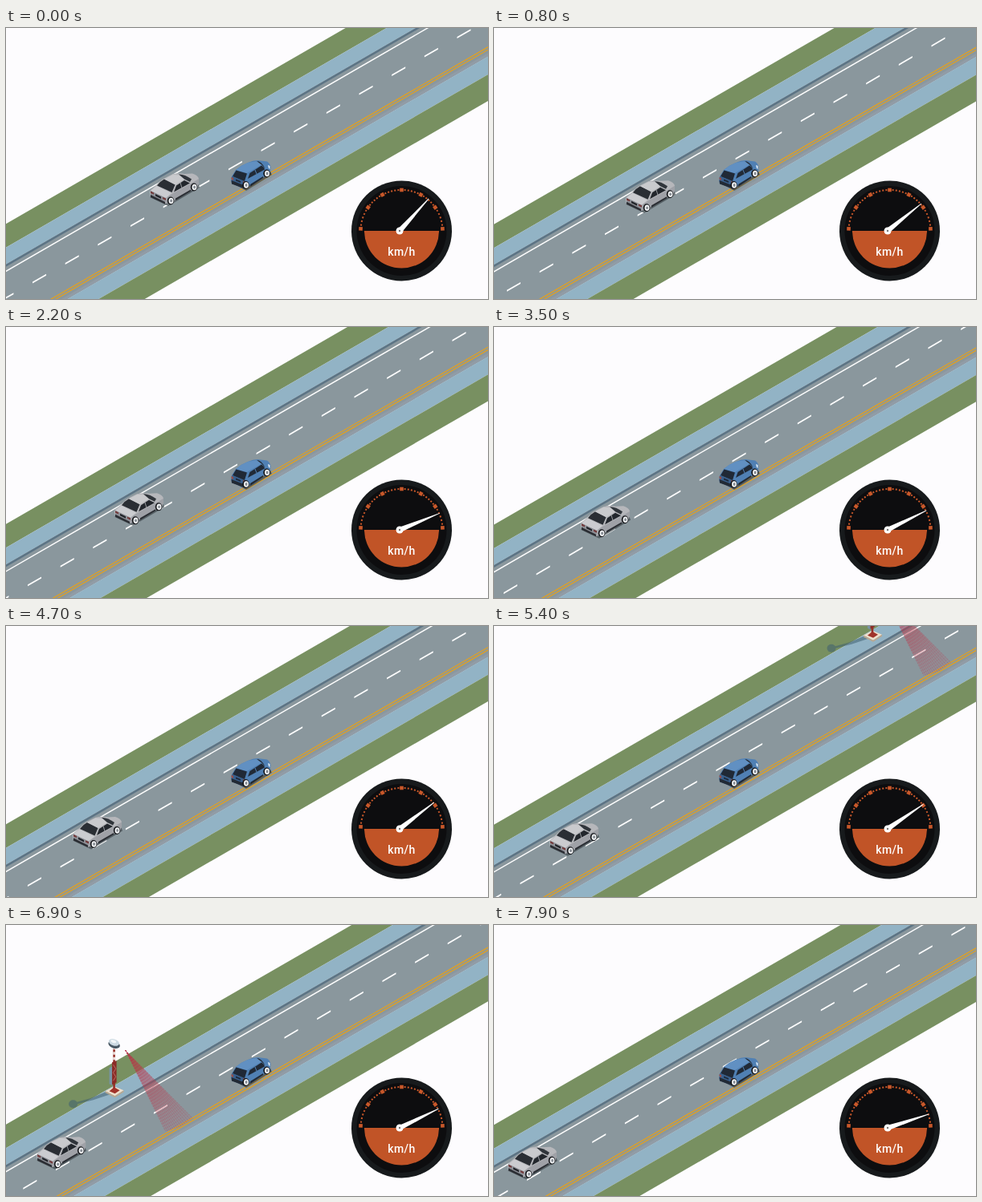
Write an HTML page that moves like this. It is 600 by 338 pixels and loops after 8 s.

```html
<!DOCTYPE html>
<html lang="en">
<head>
<meta charset="utf-8">
<title>Road and speedometer</title>
<style>
  html, body { margin: 0; width: 100%; height: 100%; overflow: hidden; background: #fdfcfe; }
  svg { display: block; width: 100vw; height: 100vh; }
  text { font: 500 14px Roboto, Arial, sans-serif; letter-spacing: .4px; }
</style>
</head>
<body>
<svg viewBox="0 0 600 338">
  <defs>
    <g id="wheel">
      <ellipse rx="4.2" ry="5" fill="#15171b"/>
      <ellipse cx=".5" rx="3" ry="3.8" fill="#f1f3f5"/>
      <ellipse cx=".6" rx="1.4" ry="1.9" fill="#868c93"/>
    </g>
    <linearGradient id="fade" gradientUnits="userSpaceOnUse" x1="328" y1="52" x2="395" y2="147">
      <stop offset="0" stop-color="#b8323f" stop-opacity=".6"/>
      <stop offset="1" stop-color="#c04a5c" stop-opacity=".12"/>
    </linearGradient>
  </defs>

  <!-- Horizontal bands, sheared to the slope of the road -->
  <g id="road"></g>

  <g id="tower">
    <g fill="#3f6070" opacity=".55">
      <ellipse cx="263" cy="119" rx="5.500" ry="5"/>
      <path d="M266 117L284 112L306 103L309 107L288 114L268 119Z"/>
    </g>
    <path d="M303 103L314 97L326 102L315 109Z" fill="#efe0cc"/>
    <path d="M303 103L315 109L326 102V104L315 111L303 105Z" fill="#b9a78f"/>
    <path d="M308 103L314 98L321 102L315 106Z" fill="#a0332a"/>
    <path d="M308 74L312 72V96L308 94Z" fill="#7894a5"/>
    <path d="M314 100V48" stroke="#96302a" stroke-width="2.600"/>
    <path d="M314 64V48" stroke="#f1e9e6" stroke-width="2.600" stroke-dasharray="3.500 3"/>
    <path d="M311.500 67L317 65V92L311.500 95Z" fill="#8b2b26"/>
    <path d="M313 70L316 75L313 80L316 85L313 90" fill="none" stroke="#c98a80" stroke-width=".7"/>
    <g transform="translate(314.500 43.500) rotate(18)">
      <ellipse cy="1.500" rx="7.500" ry="4.500" fill="#4a5965"/>
      <ellipse cx="-1" cy="-1" rx="6.800" ry="4" fill="#cddae3"/>
      <ellipse cx="-2" cy="-2" rx="3.500" ry="1.800" fill="#f2f6f8"/>
    </g>
  </g>

  <g id="sedan">
    <path d="M179 211L202 222L241 199L238 190Z" fill="#434c52" opacity=".75"/>
    <path d="M180 210Q178 205 180 202L187 196Q193 189 199 186.500L207 182.500Q214 180.500 222 182L232 181.500Q239 183.500 240 188V194L238 198L203 218L198 219Z" fill="#b6b7bb"/>
    <path d="M200 211L208 206L231 193.500L240 188V194L238 198L203 218L198 219Z" fill="#9fa1a7"/>
    <path d="M180 203L187.500 197L206 206L199 212Z" fill="#cbccd0"/>
    <path d="M180 203L199 212L198 219L180 210Z" fill="#8c8e95"/>
    <path d="M188 196.500Q192 191 197 188.500L210.500 195.500L206.500 205Z" fill="#2a2e34"/>
    <path d="M197 188.500L207.500 183L216 183.500L222 188.500L211 195.500Z" fill="#c9cacd"/>
    <path d="M215 182.500Q222 182 231 188.500L229 192L222 188.500Z" fill="#30353b"/>
    <path d="M209 204.500L212 196.500L222 190L229 193.500Z" fill="#23272d"/>
    <path d="M217 193L219 199.500" stroke="#a5a7ac" stroke-width=".9"/>
    <path d="M180 208L198 217V219.500L180 211ZM211 212.500L230 201.500V203.500L211 215Z" fill="#2a2d33"/>
    <path d="M186 207L193 210.500V213L186 209.500Z" fill="#22252a"/>
    <path d="M180 203.500L184 205.500V207.500L180 206ZM195 211L199 212.500V215L195 213Z" fill="#74393a"/>
    <use href="#wheel" x="205" y="215.500"/><use href="#wheel" x="234" y="198.500"/>
  </g>

  <g id="hatchback">
    <path d="M281 193L299 203L331 183L327 173Z" fill="#3d474f" opacity=".7"/>
    <path d="M280 190L281 185L286 177Q293 171 301 168Q310 164 317 165.500L325 166.500Q329 169 329.500 174L328.500 181L301 198L296 200L281 194Z" fill="#5080b4"/>
    <path d="M281 185L298 191L296 200L281 194Z" fill="#395f8c"/>
    <path d="M286 177Q293 171 301 168L313 166L319 170L300 181Z" fill="#6190c2"/>
    <path d="M282 185L286.500 177.500L300 181.500L297 191Z" fill="#202936"/>
    <path d="M301 188L303.500 181L318 171.500Q321 173 322 176.500Z" fill="#212a37"/>
    <path d="M310 177L312 182" stroke="#5080b4"/>
    <path d="M312 166Q318 166 322.500 175L318 170.500Z" fill="#27313e"/>
    <path d="M280.500 190L296 196V200L281 194.500ZM304 195L320 185V187L304 198Z" fill="#222a35"/>
    <path d="M286 188.500L292 191V193L286 190.500Z" fill="#1f2a3a"/>
    <path d="M280.500 186L283 187V190L280.500 189ZM295 191L298 192V195L295 194Z" fill="#96504a"/>
    <path d="M326 171L328.500 172V176L327 175Z" fill="#dce8f2"/>
    <use href="#wheel" x="298.500" y="196"/><use href="#wheel" x="324.500" y="181.500"/>
  </g>

  <g id="beam">
    <path d="M328 52L378 153Q398 149 412 137Z" fill="url(#fade)"/>
  </g>

  <g id="gauge" transform="translate(492.500 253)">
    <circle r="62.500" fill="#171a1c"/>
    <circle r="56" fill="#0d0d0f"/>
    <path d="M-46.500 0A46.500 46.500 0 0 0 46.500 0Z" fill="#c15427"/>
    <g id="ticks" fill="#c9582a"></g>
    <text y="30.500" text-anchor="middle" fill="#fff">km/h</text>
    <g transform="translate(-2.500 0)">
      <path id="needle" d="M0-3.200L54-.4V.4L0 3.200Z" fill="#fff"/>
      <circle r="4.500" fill="#fff"/>
      <circle r="1.200" fill="#777"/>
    </g>
  </g>
</svg>

<script>
const LOOP = 8000, STEP = 100, SLOPE = 0.578, GAP = 40.65;
const $ = id => document.getElementById(id);

function add(parent, name, attrs) {
  const el = document.createElementNS('http://www.w3.org/2000/svg', name);
  for (const key in attrs) el.setAttribute(key, attrs[key]);
  return $(parent).appendChild(el);
}

// Road stripes: top, bottom, colour
for (const [top, bottom, fill] of [
  [244.3, 273.8, '#789061'], [273.8, 294.8, '#92b3c5'],
  [294.8, 382.3, '#8a979d'], [294.8, 297.8, '#5c7485'],
  [302.5, 304.2, '#fff'], [369.8, 371.2, '#e5a11c'], [373.2, 374.6, '#e5a11c'],
  [378, 382.3, '#919ca6'], [382.3, 404.7, '#92b3c5'], [404.7, 437.8, '#789061']
]) add('road', 'rect', { x: -20, width: 640, y: top, height: bottom - top, fill });

const dashes = add('road', 'path', {
  d: 'M0 336.6H640', stroke: '#fff', 'stroke-width': 2, 'stroke-dasharray': `17 ${GAP - 17}`
});

// Dotted rays inside the radar beam
for (let i = 0; i <= 14; i++) {
  const u = i / 14;
  add('beam', 'path', {
    d: `M328 52L${378 + 34 * u} ${153 - 16 * u + 12 * u * (1 - u)}`,
    stroke: '#b8344a', 'stroke-width': 0.7, 'stroke-opacity': 0.5, 'stroke-dasharray': '2 1.500'
  });
}

// Dial marks: large squares with small dots in each gap
const marks = [-87, -55, -28, 0, 28, 55, 87], DOTS = 5;
function tick(angle, size) {
  add('ticks', 'rect', {
    x: -size / 2, y: -51 - size / 2, width: size, height: size, transform: `rotate(${angle})`
  });
}
marks.forEach((a, i) => {
  tick(a, 4.6);
  for (let k = 1; k <= DOTS && i < 6; k++) tick(a + (marks[i + 1] - a) * k / (DOTS + 1), 2);
});

// Key times in seconds, with the value of each moving part
const times = [0, 0.8, 2.2, 3.5, 4.7, 6.1, 7.9];
const travel = [0, 179.6, 493.8, 793.4, 1063, 1377, 1780.7];
const lag = [0, 15, 44, 71, 96, 124, 162];
const angles = [48, 39, 22.6, 26.6, 37.5, 31.7, 18.4];

function at(values, t, ease = u => u) {
  let i = 0;
  while (i < times.length - 2 && t > times[i + 1]) i++;
  const u = (t - times[i]) / (times[i + 1] - times[i]);
  return values[i] + (values[i + 1] - values[i]) * ease(u);
}
const smooth = u => u * u * (3 - 2 * u);
const move = (id, x, y) => $(id).setAttribute('transform', `translate(${x} ${y})`);

function draw(now) {
  const t = Math.floor(now % LOOP / STEP) * STEP / 1000;
  const drift = 5 * t / 7.9, distance = at(travel, t), back = at(lag, t);

  $('road').setAttribute('transform', `matrix(1 ${-SLOPE} 0 1 0 ${drift})`);
  dashes.setAttribute('stroke-dashoffset', distance - 561.5);

  const dx = travel[5] - distance;
  const dy = drift - 5 * times[5] / 7.9 - SLOPE * dx;
  move('tower', dx, dy);
  move('beam', dx, dy);
  move('sedan', -back, 0.588 * back);
  $('needle').setAttribute('transform', `rotate(${-at(angles, t, smooth)})`);
  requestAnimationFrame(draw);
}
requestAnimationFrame(draw);
</script>
</body>
</html>
```
